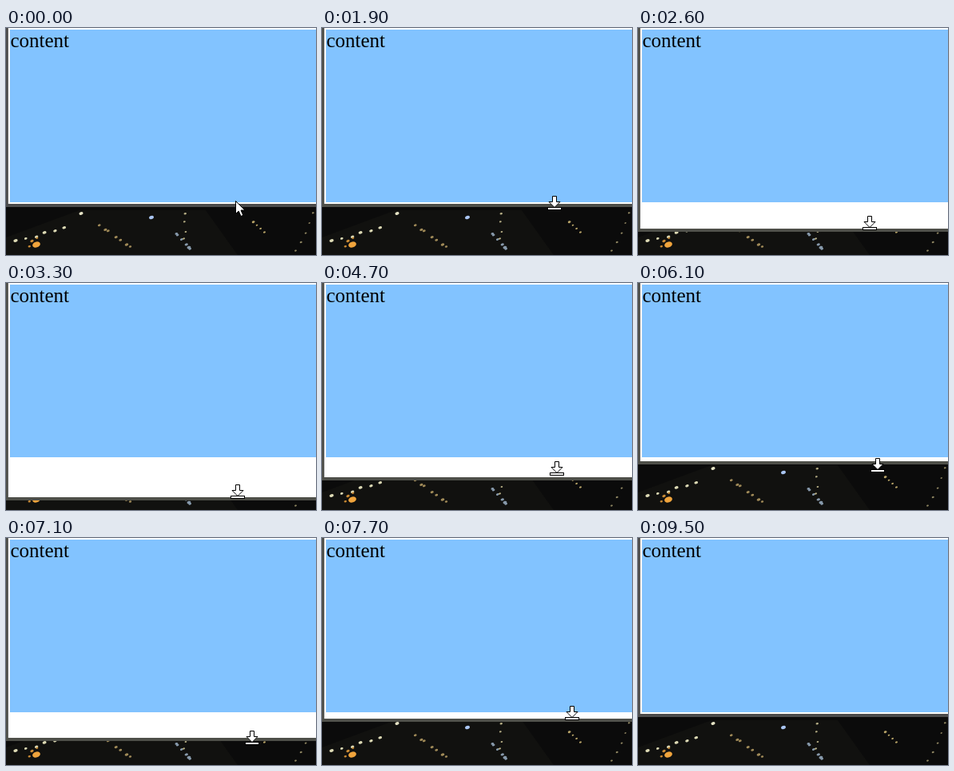
Animation, 388 px wide and 284 px high, one loop 9700 ms. Source, as an HTML page:

```html
<!DOCTYPE html>
<html lang="en">
<head>
<meta charset="utf-8">
<title>Window resize</title>
<style>
  html, body { margin: 0; width: 100%; height: 100%; overflow: hidden; background: #0b0b0b; }
  svg { display: block; }
  text { font: 25px "Liberation Serif", "Times New Roman", serif; }
  .cursor { fill: #fff; stroke: #000; stroke-width: 1; }
</style>
</head>
<body>
<svg width="388" height="284" viewBox="0 0 388 284">
  <rect width="388" height="284" fill="#0b0b0b"/>
  <path d="M92 228H250L290 284H0V262Z" fill="#11110f"/>
  <g id="city"></g>
  <rect id="frame" width="388"/>
  <rect id="edge" x="2" width="1" fill="#6a6a68"/>
  <rect id="page" x="3" width="385" fill="#fff"/>
  <rect x="5" y="2" width="383" height="216" fill="#82c3ff"/>
  <text x="5.4" y="24">content</text>
  <path id="pointer" class="cursor" d="M.5 .5V16.5L4.2 13L7 19.5L9.8 18.3L7 12H12Z"/>
  <g id="resizer" class="cursor">
    <path d="M6.5 .5H11.5V7.5H16L9 14.5L2 7.5H6.5Z"/>
    <rect x=".5" y="14.5" width="17" height="3"/>
  </g>
</svg>
<script>
const LOOP = 9700, STEP = 100, REST = 220;
const get = id => document.getElementById(id);

function set(node, attrs) {
  for (const key in attrs) node.setAttribute(key, attrs[key]);
}

let seed = 7;
function random() {
  seed = seed * 16807 % 2147483647;
  return seed / 2147483647;
}

function addLight(x, y, size, fill) {
  const light = document.createElementNS('http://www.w3.org/2000/svg', 'ellipse');
  set(light, { rx: size, ry: size * .7, fill, transform: `translate(${x} ${y}) rotate(-18)` });
  get('city').append(light);
}

// A row of lit windows from one point to another
function addRow(x1, y1, x2, y2, count, size, fill) {
  for (let i = 0; i < count; i++) {
    const part = i / (count - 1);
    const jitter = random() * 4 - 2;
    addLight(x1 + (x2 - x1) * part + jitter, y1 + (y2 - y1) * part + jitter,
      size * (.6 + random() * .4), fill);
  }
}

addRow(14, 268, 72, 249, 6, 2.8, '#dcd9b4');
addRow(28, 272, 38, 262, 3, 2.5, '#c98a35');
addRow(116, 246, 156, 274, 7, 2.4, '#a08a58');
addRow(212, 256, 232, 278, 6, 2.6, '#8799ab');
addRow(224, 232, 223, 264, 4, 2.2, '#b5ad84');
addRow(309, 242, 324, 256, 4, 2, '#b8a468');
addRow(385, 232, 362, 278, 5, 1.8, '#8f8662');
addLight(38, 271, 5, '#f0a43c');
addLight(94, 232, 2.6, '#e4e2c4');
addLight(182, 237, 3, '#a9c4f0');

// Easing powers: above 1 starts slowly, below -1 ends slowly
function ease(part, power = 1) {
  return power > 0 ? part ** power : 1 - (1 - part) ** -power;
}

// Each move: start, end, value reached, easing power
const growth = [
  [1800, 2400, 28, 3], [2500, 3800, 61], [4400, 5500, 0, -3],
  [5700, 6600, 38, 3], [7000, 7700, 6, -2], [7800, 8800, 0]
];
const cursorY = [
  [800, 1000, 205], [1800, 2400, 232], [2500, 3800, 265], [4400, 5300, 205, -3],
  [5700, 6600, 252, 1.5], [7000, 7700, 210, -2], [8700, 9500, 200]
];
const cursorX = [
  [1800, 3800, 280], [4400, 4700, 285], [4700, 6100, 291],
  [6100, 7700, 304], [8700, 9500, 388]
];

function follow(moves, time, value) {
  for (const [start, end, to, power] of moves) {
    const part = Math.min(1, Math.max(0, (time - start) / (end - start)));
    value += (to - value) * ease(part, power);
  }
  return Math.round(value);
}

function place(id, x, y, visible) {
  set(get(id), {
    transform: `translate(${x} ${y})`,
    visibility: visible ? 'visible' : 'hidden'
  });
}

function draw(now) {
  const time = Math.floor(now % LOOP / STEP) * STEP;
  const bottom = REST + follow(growth, time, 0);
  const held = time >= 1400 && time < 8700;
  const resizing = time >= 300 && time < 8800;
  const x = follow(cursorX, time, 282);
  const y = follow(cursorY, time, 206);

  set(get('frame'), { height: bottom + 4, fill: held ? '#4e4f49' : '#4c4c4c' });
  set(get('edge'), { height: bottom });
  set(get('page'), { height: bottom });
  place('resizer', x, y, resizing);
  place('pointer', x + 5, y + 10, !resizing);
}

const start = performance.now();
function tick() {
  draw(performance.now() - start);
  requestAnimationFrame(tick);
}
tick();
</script>
</body>
</html>
```
